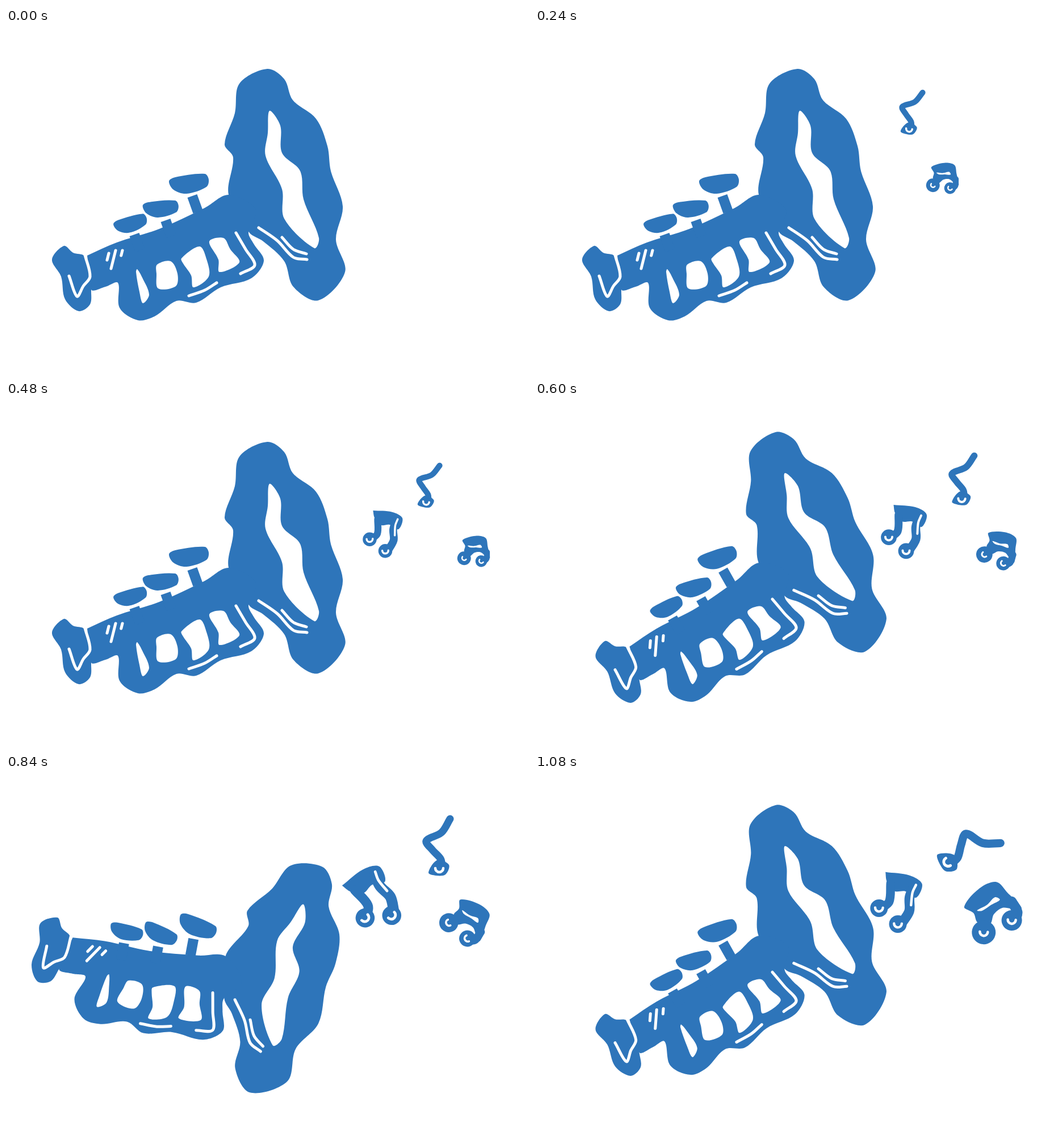
Recreate the animation shown at these times as an HTML page. Size 921 by 608 pixels, loop 1280 ms.

```html
<!DOCTYPE html>
<html lang="en">
<head>
<meta charset="utf-8">
<title>Trumpet and notes</title>
<style>
  html, body { margin: 0; width: 100%; height: 100%; overflow: hidden; background: #fff; }
  svg { display: block; width: 100vw; height: 100vh; }
  path { stroke-linecap: round; stroke-linejoin: round; }
  .stem { stroke-linecap: butt; }
</style>
</head>
<body>
<svg id="stage" viewBox="0 0 921 608" preserveAspectRatio="none"></svg>
<script>
const NS = 'http://www.w3.org/2000/svg';
const INK = '#2e75ba', PAPER = '#fff';
const STEP = 120, LOOP = 1280, LAST = 9;

function add(parent, tag, attrs = {}) {
  const el = document.createElementNS(NS, tag);
  for (const key in attrs) el.setAttribute(key, attrs[key]);
  return parent.appendChild(el);
}

// Smooth path through key points; a point given twice makes a corner.
function curve(text, closed) {
  const pts = text.trim().split(/\s+/).map(p => p.split(',').map(Number));
  const n = pts.length;
  const at = i => closed ? pts[(i + n) % n] : pts[Math.max(0, Math.min(n - 1, i))];
  const dist = (a, b) => Math.hypot(b[0] - a[0], b[1] - a[1]);
  const handle = (i, len) => {
    const a = at(i - 1), p = at(i), b = at(i + 1);
    const k = len / 3 / (dist(a, p) + dist(p, b));
    return [(b[0] - a[0]) * k, (b[1] - a[1]) * k];
  };
  let d = 'M' + pts[0];
  for (let i = 0; i < (closed ? n : n - 1); i++) {
    const p = at(i), q = at(i + 1), len = dist(p, q);
    const u = handle(i, len), v = handle(i + 1, len);
    d += `C${p[0] + u[0]},${p[1] + u[1]} ${q[0] - v[0]},${q[1] - v[1]} ${q}`;
  }
  return closed ? d + 'Z' : d;
}

const blob = (g, fill, text) => add(g, 'path', { fill, d: curve(text, true) });
const line = (g, stroke, width, text) =>
  add(g, 'path', { fill: 'none', stroke, 'stroke-width': width, d: curve(text) });

// Round note head with a white smile.
function head(g, x, y, r) {
  add(g, 'circle', { cx: x, cy: y, r, fill: INK });
  add(g, 'path', { fill: 'none', stroke: PAPER, 'stroke-width': 4.5, d: `M${x - 7},${y - 1}a7,7 0 0 0 14,0` });
}

function valve(g, x, y, size, turn, stemX, stemY) {
  line(g, INK, 18, `${stemX},${stemY} ${stemX + 10},${stemY + 28}`).setAttribute('class', 'stem');
  blob(g, INK, '-35,-4 -24,-11 28,-17 35,-7 31,6 -4,18 -27,11')
    .setAttribute('transform', `translate(${x} ${y}) rotate(${turn}) scale(${size})`);
}

function drawTrumpet(g) {
  // bell
  blob(g, INK, `460,72 490,90 505,127 546,160 566,208 572,252 593,314 581,373 597,430
    550,480 506,456 490,411 453,376 428,360 392,294 400,228 385,205 403,150 411,98`);
  // pipe and tubing
  blob(g, INK, `143,401 143,401 195,378 270,354 350,317 392,294 440,320 427,360 436,380
    454,410 432,441 378,457 335,484 300,481 262,508 232,515 200,493 197,449 175,456 150,461`);
  // mouthpiece
  blob(g, INK, '102,384 118,396 138,402 150,440 150,461 148,487 128,499 104,478 97,438 81,408');

  valve(g, 322, 274, 1, 0, 328, 296);
  valve(g, 272, 318, 0.9, 3, 281, 339);
  valve(g, 219, 345, 0.85, -8, 226, 364);

  blob(g, PAPER, `464,146 483,172 486,220 518,252 524,302 551,370 543,388 490,336
    486,284 457,225 461,185`);
  for (const hole of [
    '231,425 240,440 252,470 241,485 235,465 229,430',
    '266,417 290,411 302,433 299,455 268,459 265,433',
    '309,406 341,385 353,407 357,438 330,457 326,436 312,415',
    '358,376 383,370 395,390 411,413 376,430 374,408'
  ]) blob(g, PAPER, hole);

  for (const shine of [
    '139,400 148,438 136,455 125,473 111,437',
    '405,361 422,390 438,418 413,433',
    '322,472 350,462 371,449',
    '445,352 478,375 506,404 530,408',
    '486,369 506,390 529,398'
  ]) line(g, PAPER, 5, shine);
  [12, 32, 9].forEach((len, i) => {
    const x = 181 + 12 * i, y = i ? 392 : 397;
    line(g, PAPER, 5, `${x},${y} ${x - len / 4},${y + len}`);
  });
}

function drawSingle(g) {
  line(g, INK, 13, '782,79 767,103 740,118 751,134 765,149 768,160');
  blob(g, INK, '759,152 780,160 774,177 757,179 744,174');
  head(g, 763, 167, 10);
}

function drawPair(g) {
  blob(g, INK, '616,170 616,170 660,175 683,190 673,215 653,204 633,204 619,187');
  line(g, INK, 16, '626,190 624,224 608,237');
  line(g, INK, 18, '668,195 661,215 661,240 648,262');
  line(g, PAPER, 4.5, '672,192 666,206 664,229');
  head(g, 606, 236, 16);
  head(g, 641, 264, 16);
}

function drawArch(g) {
  blob(g, INK, '755,236 780,202 809,189 830,207 856,232 838,234 822,234 808,246 802,264 780,262 772,246');
  line(g, INK, 18, '838,222 849,240 846,254');
  blob(g, PAPER, '778,241 787,241 802,230 817,220 808,216 795,230');
  head(g, 792, 279, 21);
  head(g, 840, 255, 18);
}

// Trumpet rocks through four beats: turn, shift, and rise gained per cycle.
const PIVOT = [333, 308];
const rock = [
  { turn: 0, x: 0, y: 0, rise: 0 },
  { turn: -9.75, x: 5, y: 1, rise: 0 },
  { turn: 0, x: 2, y: 0, rise: 0 },
  { turn: 30.2, x: -1.5, y: 0.5, rise: 5 }
];

// A note leans on every n-th step and moves from its early to its late pose.
// Pose: x, y of the origin, size, turn.
const notes = [
  { draw: drawSingle, origin: [762, 168], start: 2, every: 3, enter: -81,
    rest: [[739, 179, 0.765, 8], [762, 168, 1, 0]],
    lean: [[734.5, 166, 0.8, 53], [725, 155, 1.1, 58]] },
  { draw: drawPair, origin: [641, 265], start: 3, every: 4, enter: 0,
    rest: [[668, 265, 0.765, -2], [639, 265.5, 0.97, 1.5]],
    lean: [[651, 253, 0.7, -44], [680, 250, 1.05, -44]] },
  { draw: drawArch, origin: [841, 256], start: 2, every: 3, enter: -106,
    rest: [[837, 283, 0.57, 36], [812, 291, 0.8, 67]],
    lean: [[835, 274, 0.61, 17.6], [840.5, 259, 1, 3.3]] }
];

const stage = document.getElementById('stage');
const trumpet = add(stage, 'g');
drawTrumpet(trumpet);
for (const note of notes) note.draw(note.group = add(stage, 'g'));

function place(group, [ox, oy], [x, y, size, turn]) {
  group.setAttribute('transform',
    `translate(${x} ${y}) rotate(${turn}) scale(${size}) translate(${-ox} ${-oy})`);
}

function pose(step) {
  const { turn, x, y, rise } = rock[step % 4];
  const gain = rise * Math.floor(step / 4);
  place(trumpet, PIVOT, [PIVOT[0] + x - gain * 0.6, PIVOT[1] + y - gain, 1, turn]);

  const grown = Math.max(0, Math.min(1, (step - 4) / 2));
  for (const note of notes) {
    const leaning = step % note.every === (note.every === 4 ? 3 : 0);
    const [early, late] = leaning ? note.lean : note.rest;
    const now = early.map((v, i) => v + (late[i] - v) * grown);
    if (step === note.start) now[0] += note.enter;
    note.group.style.display = step < note.start ? 'none' : '';
    place(note.group, note.origin, now);
  }
}

function tick() {
  pose(Math.min(LAST, Math.floor(performance.now() % LOOP / STEP)));
  requestAnimationFrame(tick);
}
tick();
</script>
</body>
</html>
```
